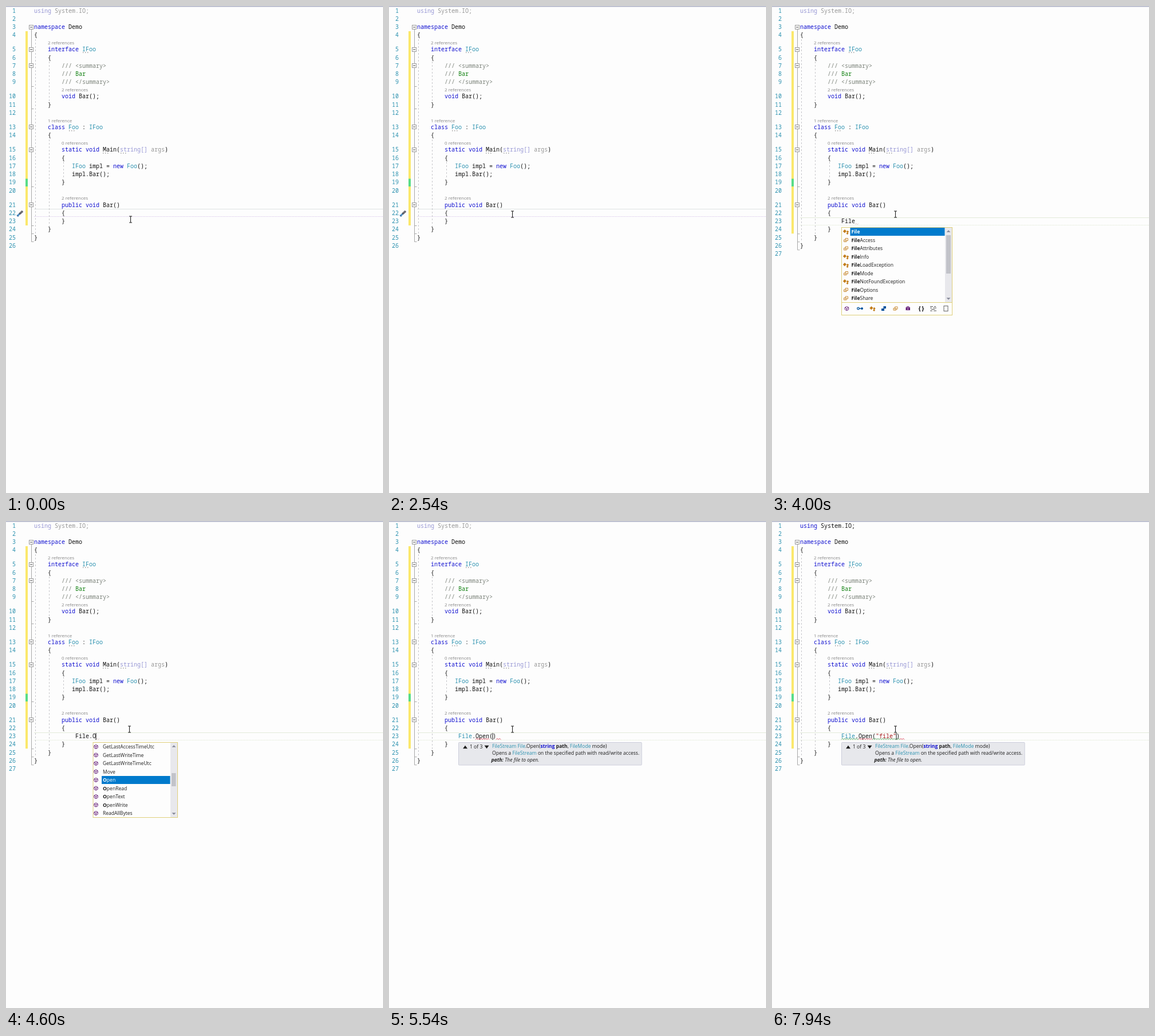
An HTML page that plays this animation: 658x850 px, repeating every 8 s.

```html
<!DOCTYPE html>
<html lang="en">
<head>
<meta charset="utf-8">
<title>Code editor</title>
<style>
html, body { margin: 0; width: 100%; height: 100%; overflow: hidden; background: #fdfdfd; }
svg { display: block; }
text { white-space: pre; }
.code { font: 10px "Noto Sans Mono", "DejaVu Sans Mono", monospace; fill: #111; }
.ui { font: 8.57px "Open Sans", "Noto Sans", sans-serif; fill: #1e1e1e; }
.lens { font: 8px "Open Sans", "Noto Sans", sans-serif; fill: #858585; }
.k { fill: #1010d0; } .t { fill: #2b91af; } .g { fill: #7c837a; } .c { fill: #108010; }
.f { fill: #9696d4; } .u { fill: #969696; } .s { fill: #a31515; }
.b { font-weight: bold; } .kb { fill: #1010d0; font-weight: bold; }
.i { font-style: italic; } .bi { font-style: italic; font-weight: bold; }
</style>
</head>
<body>
<svg width="658" height="850" viewBox="0 0 658 850"><g id="back"></g><g id="live"></g></svg>
<script>
const LOOP = 8000, STEP = 14.25, CHAR = 6;
const ENTER = 2600, USED = 6300, HINT = 5270;
const DOC = "/".repeat(3);

// Markup: ~class text~ colours a run.
const LINES = [
  [49, ""], [49, ""], [49, "~k namespace~ Demo"], [49, "{"],
  [73, "~k interface~ ~t IFoo~", "2 references"], [73, "{"],
  [97, `~g ${DOC} <summary>~`], [97, `~g ${DOC}~ ~c Bar~`], [97, `~g ${DOC} </summary>~`],
  [97, "~k void~ Bar();", "2 references"], [73, "}"], [49, ""],
  [73, "~k class~ ~t Foo~ : ~t IFoo~", "1 reference"], [73, "{"],
  [97, "~k static void~ Main(~f string[]~ ~u args~)", "0 references"], [97, "{"],
  [115, "~t IFoo~ impl = ~k new~ ~t Foo~();"], [115, "impl.Bar();"], [97, "}"], [49, ""],
  [97, "~k public void~ Bar()", "2 references"], [97, "{"],
  [97, "}"], [73, "}"], [49, "}"], [49, ""]
];

// Typed states: time, text, caret column.
const KEYS = [
  [ENTER, "", 0], [2950, "F", 1], [3100, "Fi", 2], [3250, "Fil", 3], [3400, "File", 4],
  [4270, "File.", 5], [4470, "File.O", 6], [5200, "File.Open()", 10],
  [6150, 'File.Open("")', 11], [6400, 'File.Open("f")', 12], [7150, 'File.Open("fi")', 13],
  [7350, 'File.Open("fil")', 14], [7550, 'File.Open("file")', 15], [7800, 'File.Open("file")', 16]
];

const TYPES = ["File", "FileAccess", "FileAttributes", "FileInfo", "FileLoadException",
  "FileMode", "FileNotFoundException", "FileOptions", "FileShare"];
const ENUMS = /Access|Attributes|Mode|Options|Share/;
const METHODS = ["GetLastAccessTimeUtc", "GetLastWriteTime", "GetLastWriteTimeUtc", "Move",
  "Open", "OpenRead", "OpenText", "OpenWrite", "ReadAllBytes"];

const esc = s => s.replace(/&/g, "&amp;").replace(/</g, "&lt;");
const runs = s => esc(s).replace(/~(\w+) (.*?)~/g, '<tspan class="$1">$2</tspan>');
const text = (x, y, s, cls = "code", more = "") => `<text x="${x}" y="${y}" class="${cls}" ${more}>${runs(s)}</text>`;
const rect = (x, y, w, h, fill, more = "") => `<rect x="${x}" y="${y}" width="${w}" height="${h}" fill="${fill}" ${more}/>`;
const path = (d, stroke, more = "") => `<path d="${d}" fill="none" stroke="${stroke}" ${more}/>`;
const solid = (d, fill) => `<path d="${d}" fill="${fill}"/>`;

// Vertical centre of each row; captions push rows down.
const mid = LINES.map((l, i) =>
  8 + STEP * i + 10.82 * LINES.slice(0, i + 1).filter(r => r[2]).length);
mid.push(mid[25] + STEP);
const base = y => Math.round(y + 3.5);

function wave(x1, x2, y, color, more = "") {
  let d = `M${x1} ${y + 1}`;
  for (let x = x1 + 2, up = 1; x <= x2; x += 2, up ^= 1) d += `L${x} ${up ? y - 1 : y + 1}`;
  return path(d, color, `stroke-width=".9" ${more}`);
}

const dots = (x, y) => [0, 4, 8].map(d => rect(x + d, y, 1.4, 1.4, "#8f8f8f")).join("");
const dash = (x, y1, y2) => path(`M${x} ${y1}V${y2}`, "#c6c6ca", 'stroke-dasharray="3 3"');
const tri = (x, y, r, dir, fill) => solid(`M${x - r} ${y + r * dir / 2}h${2 * r}L${x} ${y - r * dir / 2}z`, fill);

const icon = {
  cube: (x, y) => path(`M${x} ${y - 3.5}l3.2 1.7v3.6l-3.2 1.7l-3.2-1.7v-3.6zM${x - 3} ${y - 1.7}l3 1.6l3-1.6M${x} ${y}v3`, "#68217a"),
  cls: (x, y) => solid(`M${x - 2} ${y - 4}l3 3l-3.2 3.2l-3-3zM${x + 3} ${y - 2.3}l2.2 2.2l-2.2 2.2l-2.2-2.2zM${x + 2.6} ${y + 1}l2 2l-2 2l-2-2z`, "#c27d1a"),
  enm: (x, y) => path(`M${x - 1} ${y - .5}v-2.5h4.5v4h-2M${x - 3.5} ${y - .5}h4.5v3.5h-4.5zM${x - 2} ${y + 1.3}h2`, "#c98c35")
};

function drawBack() {
  let s = rect(0, 0, 658, 1.5, "#adb2c6");
  LINES.forEach(([x, code, lens], i) => {
    const y = mid[i];
    s += text(17, base(y), String(i + 1), "code t", 'text-anchor="end"');
    if (lens) s += text(x, Math.round(y - 8.8), lens, "lens");
    if (i < 22) s += text(x, base(y), code);
  });
  s += dots(134, 80.5) + dots(110, 217) + dots(169, 256) + dots(200, 256);
  return s + dash(75.5, 97, 167) + dash(100.5, 272, 302);
}

function margin(shift) {
  const end = 411.5 + shift;
  let s = rect(34, 44, 4, 339 + shift, "#fbe86c") + rect(34, 301.5, 4, 13.5, "#58dc88");
  s += path(`M44.5 41V${end}h4` + [140.5, 179.5, 315.5, 383.5 + shift, 397.5 + shift]
    .map(y => `M44.5 ${y}h4`).join(""), "#a8a8a8");
  for (const i of [2, 4, 6, 12, 14, 20]) {
    const y = Math.round(mid[i]) + .5;
    s += rect(40.5, y - 4, 7, 7, "#fff", 'stroke="#999"') + path(`M42 ${y - .5}h4`, "#444");
  }
  return s + dash(51.5, 58, 398 + shift) + dash(75.5, 233, 384 + shift);
}

function driver() {
  return path("M19.5 367L24 362.5", "#4a8cc4", 'stroke-width="3"') +
    path("M23.5 363L29 358", "#54545c", 'stroke-width="3.4"') +
    path("M25 361.5L28 358.5", "#a8a8b0") + path("M19 364.5l3 3", "#2d5b88");
}

function list(x, w, items, pick, typed, glyph, thumb, foot) {
  const bar = x + w - 13, indent = 17.5;
  let s = rect(x + .5, 386.5, w - 1, foot ? 153 : 131, "#fdfdfd", 'stroke="#dfd07c"');
  s += rect(bar, 387, 12, 130, "#e8e8ec");
  s += rect(bar + thumb[2], thumb[0], thumb[3], thumb[1], "#c2c3c9");
  s += tri(bar + 6, 393, 3.5, 1, "#868999") + tri(bar + 6, 511, 3.5, -1, "#868999");
  s += rect(x + 15.5, 387 + pick * 14.5, w - 29, 14, "#007acc");
  items.forEach((name, i) => {
    const y = 394 + i * 14.5, hit = name.startsWith(typed);
    const label = hit ? `~b ${typed}~${name.slice(typed.length)}` : name;
    s += glyph(x + (foot ? 8 : 5.5), y, name);
    s += text(x + indent, Math.round(y + 3), label, "ui", i === pick ? 'style="fill:#fff"' : "");
  });
  return s;
}

function filters() {
  const y = 528;
  let s = path("M122 517.5H314", "#dfd07c") + icon.cube(130.5, y) + icon.cls(175.5, y) + icon.enm(215.5, y);
  s += `<circle cx="150.5" cy="${y}" r="1.8" fill="none" stroke="#00539c" stroke-width="1.3"/>`;
  s += path(`M152 ${y}h4`, "#00539c", 'stroke-width="1.4"') + `<circle cx="157" cy="${y}" r="2" fill="#00539c"/>`;
  s += rect(194.5, y - 4, 4.5, 4, "#00539c") + rect(191, y, 5, 4, "#00539c");
  s += rect(233.5, y - 2, 7.5, 5, "#68217a") + path("M235.5 526v-1.5h3.5v1.5", "#68217a") + rect(236.5, y, 1.5, 1.5, "#fff");
  s += text(254.5, y + 3.5, "~b {}~");
  s += path("M276 524.5h5M283 524.5h3M276 527h3M281 527h6M278 529.5h6M276 532h4M282 532h5", "#555", 'stroke-width="1.2"');
  return s + rect(300, 523.5, 7, 9, "#fdfdfd", 'stroke="#666"');
}

function hint() {
  return rect(121.5, 386.5, 319.5, 39.5, "#e7e8ec", 'stroke="#cccedb" rx="1"') +
    tri(133, 394.5, 4, 1.4, "#1e1e1e") + tri(170.5, 394.5, 4, -1.4, "#1e1e1e") +
    text(141, 397, "1 of 3", "ui") +
    text(180, 396, "~t FileStream~ ~t File~.Open(~kb string~ ~b path~, ~t FileMode~ mode)", "ui") +
    text(180, 408, "Opens a ~t FileStream~ on the specified path with read/write access.", "ui") +
    text(178.5, 420, "~bi path:~ ~i The file to open.~", "ui");
}

function typedLine(t, s) {
  const x = 121, y = mid[22], end = x + s.length * CHAR, uy = 380.5;
  const open = s.includes("(");
  let out = text(x, base(y), open
    ? s.replace(/^File/, "~t File~").replace(/".*"/, "~s $&~") : s);
  if (open) {
    if (t >= USED) out += wave(121, 151, uy, "#3c9a4a") + wave(175, end, uy, "#3c9a4a");
    out += wave(151, 175, uy, "#d8364a") + wave(end, end + 8, uy, "#d8364a");
  } else if (s) out += wave(end, end + 6, uy, "#b98f8f", 'opacity=".5"');
  return out;
}

function pointer(t) {
  const p = Math.min(1, Math.max(0, (t - 900) / 700)), e = p * p * (3 - 2 * p);
  const x = Math.round(217 - 2 * e) + .5, y = Math.round(372 - 9 * e) + .5;
  return path(`M${x - 2.5} ${y - 5.5}h2l.5 .5l.5-.5h2M${x} ${y - 5}v10M${x - 2.5} ${y + 5.5}h2l.5-.5l.5 .5h2`, "#222", 'stroke-width="1.1"');
}

function scene(t) {
  const added = t >= ENTER, shift = added ? STEP : 0;
  const [since, typed, col] = KEYS.filter(k => k[0] <= t).pop() || [-530, "", 0];
  const row = added ? 22 : 21, cy = mid[row];
  let s = path(`M49 ${Math.round(cy - 7) + .5}H658`, added ? "#e3ebd9" : "#dfe4e3");
  s += path(`M49 ${Math.round(cy + 6) + .5}H658`, added ? "#e3ebd9" : "#dccdec", 'stroke-dasharray="1.5 1"');
  s += margin(shift);
  s += text(49, 12, t < USED ? "~f using~ ~u System.IO;~" : "~k using~ System.IO;");
  for (let i = 22; i < 25; i++) s += text(LINES[i][0], base(mid[i] + shift), LINES[i][1]);
  if (added) {
    s += text(17, base(mid[26]), "27", "code t", 'text-anchor="end"') + typedLine(t, typed);
  } else s += driver();

  if ((t - since) % 1060 < 530) {
    s += rect(added ? 120.5 + col * CHAR : 103, Math.round(cy - 6), 1, 12, "#111");
  }
  if (t >= 2950 && t < 4270) {
    s += list(121, 194, TYPES, 0, typed, (x, y, n) => icon[ENUMS.test(n) ? "enm" : "cls"](x, y), [400, 67, 2, 8], true) + filters();
  } else if (t >= 4470 && t < 5200) {
    s += list(151.5, 148.5, METHODS, 4, "O", icon.cube, [440, 23, 2, 7.5], false);
  } else if (t >= HINT) s += hint();
  return s + pointer(t);
}

const live = document.getElementById("live");
document.getElementById("back").innerHTML = drawBack();
let shown = "";
function draw() {
  const next = scene(performance.now() % LOOP);
  if (next !== shown) live.innerHTML = shown = next;
  requestAnimationFrame(draw);
}
draw();
</script>
</body>
</html>
```
